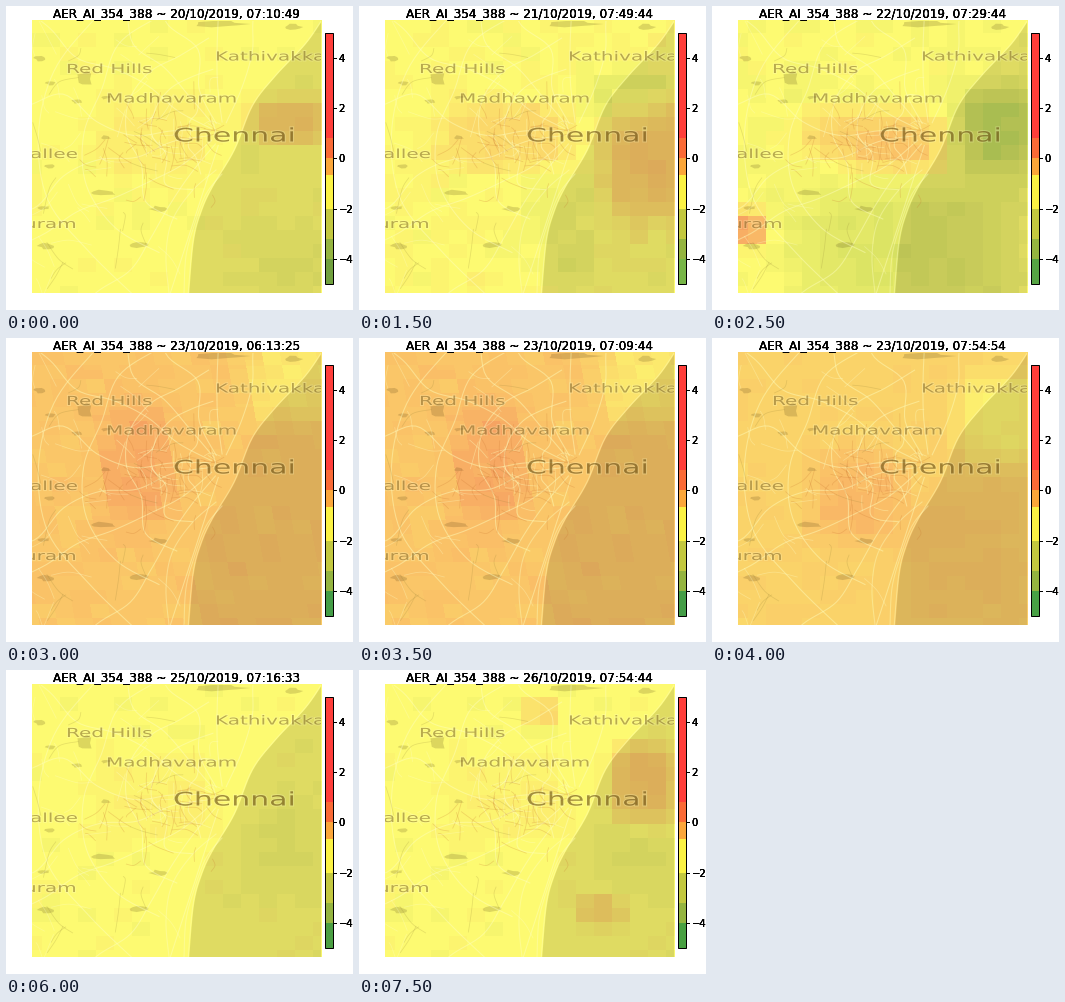
A matplotlib script for the animation above (8000 ms loop, 347x304 px).

```python
import matplotlib.pyplot as plt
import numpy as np
from matplotlib.animation import FuncAnimation
from matplotlib.patches import PathPatch, Polygon, Rectangle
from matplotlib.textpath import TextPath
from matplotlib.transforms import Affine2D

W, H, DPI = 347, 304, 72
LEFT, TOP, RIGHT, BOTTOM = 26, 15, 315, 287
plt.rcParams["font.family"] = "DejaVu Sans"

fig = plt.figure(figsize=((W + 1e-3) / DPI, (H + 1e-3) / DPI), dpi=DPI,
                 facecolor="white")
ax = fig.add_axes([0, 0, 1, 1])
ax.set(xlim=(0, W), ylim=(H, 0))
ax.axis("off")
frame = Rectangle((LEFT, TOP), RIGHT - LEFT, BOTTOM - TOP,
                  transform=ax.transData)

# Aerosol colours over land, from low to high
RAMP = np.array([plt.matplotlib.colors.to_rgb(c) for c in (
    "#96c655", "#d6e062", "#fdfa71", "#fbd86a", "#fabe67", "#f69e62")])
X, Y = np.meshgrid(np.arange(LEFT, RIGHT) + 0.5, np.arange(TOP, BOTTOM) + 0.5)


def field(seed, base, noise, *blobs, cell=(18, 14), shear=0.0):
    """Blocky value field: base level plus soft-edged boxes (x, y, rx, ry, amp)."""
    cw, ch = cell
    ci = np.floor((X - shear * Y) / cw).astype(int)
    cj = np.floor(Y / ch).astype(int)
    cx, cy = (ci + 0.5) * cw + shear * Y, (cj + 0.5) * ch
    grid = np.random.default_rng(seed).normal(0, noise, (60, 60))
    v = base + grid[cj % 60, ci % 60]
    for x, y, rx, ry, amp in blobs:
        v += amp * np.exp(-((cx - x) / rx) ** 4 - ((cy - y) / ry) ** 4)
    v = np.clip(np.round(v * 6) / 6, 0, 5)
    steps = np.arange(len(RAMP))
    return np.stack([np.interp(v, steps, RAMP[:, k]) for k in range(3)], -1)


oct20 = field(1, 2, 0.07, (285, 115, 42, 22, 1.4), (150, 135, 60, 40, 0.4),
              (285, 255, 40, 36, -0.3))
oct21 = field(2, 2.05, 0.1, (145, 130, 65, 32, 1), (290, 150, 48, 62, 1.6),
              (270, 95, 45, 26, -0.9), (205, 225, 34, 60, -0.4))
oct22 = field(3, 1.95, 0.08, (160, 128, 70, 24, 1.3), (185, 150, 46, 18, 1),
              (34, 222, 17, 18, 2.8), (190, 245, 110, 68, -0.75),
              (290, 125, 48, 46, -1.3))
oct23a = field(4, 3.7, 0.1, (132, 125, 38, 62, 0.9),
               (290, 40, 55, 45, -1.2), shear=0.18)
oct23b = field(5, 3.2, 0.07, (145, 160, 48, 48, 0.9),
               (290, 80, 45, 48, -1), (250, 215, 70, 72, 0.4))
oct24 = field(6, 2.5, 0.08, (135, 110, 62, 105, 1), (160, 180, 42, 32, 1),
              (265, 185, 58, 58, 0.9), (215, 262, 38, 26, -0.4))
city = (150, 130, 60, 40, 0.3)
bay = (285, 180, 42, 50, -0.25)
oct25 = field(7, 2, 0.06, city, bay)
oct26 = field(7, 2, 0.06, city, bay, (285, 115, 34, 40, 1.7),
              (182, 44, 14, 14, 1.1), (240, 240, 24, 18, 1))

# Each day: map, lowest colour-bar tone, pass times
PASSES = [
    (oct20, "#70a03e", "20/10/2019, 07:10:49", "20/10/2019, 08:09:44"),
    (oct21, "#78b648", "21/10/2019, 06:51:47", "21/10/2019, 07:49:44"),
    (oct22, "#56a444", "22/10/2019, 06:32:36", "22/10/2019, 07:29:44"),
    (oct23a, "#449d47", "23/10/2019, 06:13:25", "23/10/2019, 07:09:44"),
    (oct23b, "#48a145", "23/10/2019, 07:54:54", "23/10/2019, 08:54:44"),
    (oct24, "#4b9f43", "24/10/2019, 07:35:44", "24/10/2019, 08:34:44"),
    (oct25, "#4b9f43", "25/10/2019, 07:16:33", "25/10/2019, 08:14:44"),
    (oct26, "#48a042", "26/10/2019, 06:57:22", "26/10/2019, 07:54:44"),
]

image = ax.imshow(oct20, extent=(LEFT, RIGHT, BOTTOM, TOP), aspect="auto",
                  interpolation="nearest", zorder=1)
ax.set(xlim=(0, W), ylim=(H, 0))


def smooth(points, n=8):
    """Catmull-Rom curve through the points."""
    p = np.array([points[0], *points, points[-1]], float)
    t = np.linspace(0, 1, n, endpoint=False)[:, None]
    out = []
    for a, b, c, d in zip(p, p[1:], p[2:], p[3:]):
        out.append(b + 0.5 * t * (c - a + t * (
            2 * a - 5 * b + 4 * c - d + t * (3 * (b - c) + d - a))))
    return np.vstack(out + [p[-1:]])


def on_map(artist):
    ax.add_artist(artist)
    artist.set_clip_path(frame)


def road(points, color="#ffffbe", lw=1.0, alpha=0.4):
    line, = ax.plot(*smooth(points).T, color=color, lw=lw, alpha=alpha, zorder=3)
    line.set_clip_path(frame)


# Sea and lakes
shore = np.array([(318, 12), (300, 38), (270, 70), (247, 100), (229, 144),
                  (207, 181), (196, 205), (188, 235), (183, 290)])
sea = np.vstack([smooth(shore), (330, 290), (330, 12)])
on_map(Polygon(sea, fc="#100800", alpha=0.125, lw=0, zorder=2))
road(shore - (1, 0))

rng = np.random.default_rng(12)


def lake(x, y, rx, ry):
    a = np.linspace(0, 2 * np.pi, 11)[:-1]
    r = rng.uniform(0.6, 1.2, 10)
    on_map(Polygon(np.c_[x + rx * r * np.cos(a), y + ry * r * np.sin(a)],
                   fc="#302000", alpha=0.16, lw=0, zorder=2))


for x, y, rx in [(78, 73, 8), (98, 187, 15), (40, 240, 8), (152, 203, 9),
                 (134, 239, 10), (215, 18, 26), (287, 21, 9), (34, 52, 6)]:
    lake(x, y, rx, 8 if y == 73 else 3)
for _ in range(6):
    lake(rng.uniform(30, 130), rng.uniform(30, 280), 6, 2)

# Main roads: rays and rings around the harbour, plus two channels
hub = np.array([216, 128])


def polar(r, deg):
    a = np.radians(deg)
    return hub + np.c_[r * np.cos(a), r * np.sin(a)]


for deg in range(108, 290, 20):
    r = np.linspace(12, 240, 7)
    road(polar(r, deg + rng.normal(0, 4, 7) * (deg > 115)), lw=1.1, alpha=0.45)
for r in (36, 66, 98, 138, 176):
    deg = np.linspace(118, 262, 8)
    road(polar(r + rng.normal(0, 5, 8), deg), lw=1.1, alpha=0.45)
road([(210, 164), (186, 185), (166, 215), (160, 250), (163, 287)], lw=1.1)
road([(216, 168), (200, 188), (188, 220), (180, 250), (178, 287)], lw=1.1)


def lane(x, y, a, d, bend, color, alpha):
    step = np.array([np.cos(a), np.sin(a)]) * d
    road([(x, y) - step, (x, y) + rng.normal(0, bend, 2), (x, y) + step],
         color, 0.8, alpha)


# City streets, denser towards the centre
for k in range(75):
    x, y = min(rng.normal(158, 32), 208), rng.normal(138, 20)
    a = rng.choice([0.1, 1.5]) + rng.normal(0, 0.35)
    style = ("#c8702c", 0.24) if k % 3 else ("#ffffbe", 0.4)
    lane(x, y, a, rng.uniform(6, 14), 2, *style)

# Country lanes
for k in range(40):
    style = ("#ffffc8", 0.32) if k % 3 else ("#8a7a30", 0.2)
    lane(rng.uniform(26, 165), rng.uniform(18, 285), rng.uniform(0, np.pi),
         rng.uniform(8, 20), 3, *style)

# Place names; the map tiles are wider than tall
TILE_ASPECT = 1.6


def place(name, x, y, size=12.5, alpha=0.42):
    path = TextPath((0, 0), name, size=size)
    path = Affine2D().scale(TILE_ASPECT, -1).translate(x, y).transform_path(path)
    on_map(PathPatch(path, fc="none", ec="#ffffc8", lw=2, alpha=0.25, zorder=4))
    on_map(PathPatch(path, fc="#5a3c00", lw=0, alpha=alpha, zorder=5))


place("Red Hills", 60, 67)
place("Kathivakkam", 209, 54.5)
place("Madhavaram", 100, 96.5)
place("Chennai", 167, 135.5, 18.7, 0.55)
place("allee", 24, 152)
place("uram", 18, 222)

# Colour bar
BAR_X, BAR_W, ZERO, UNIT = 318.5, 8, 152.5, 25.15
BANDS = [(5, "#ff3e3a"), (0.8, "#fa6a36"), (0, "#fba63a"), (-0.65, "#fbf244"),
         (-2, "#c3c83f"), (-3.2, "#94b440"), (-4, "#56a444")]
for hi, color in BANDS:
    band = ax.add_patch(Rectangle((BAR_X, ZERO - hi * UNIT), BAR_W,
                                  (hi + 5) * UNIT, fc=color, lw=0, zorder=2))
ax.add_patch(Rectangle((BAR_X, ZERO - 5 * UNIT), BAR_W, 10 * UNIT, fc="none",
                       ec="black", lw=1, zorder=3))


def ink(x, y, text, size, **kw):
    """Overprinted text, which hardens its edges."""
    return [ax.text(x, y, text, size=size, color="black", zorder=6, **kw)
            for _ in range(4)]


for v in range(-4, 5, 2):
    y = ZERO - v * UNIT
    ax.plot([BAR_X + BAR_W, BAR_X + BAR_W + 3.5], [y, y], color="black", lw=1)
    ink(332.5, y + 3.7, str(v).replace("-", "\u2212"), 10, va="baseline")

title = ink(170.5, 11, "", 12, ha="center", va="baseline")


def draw(i):
    day, tone, *times = PASSES[i // 2]
    image.set_data(day)
    band.set_facecolor(tone)
    for t in title:
        t.set_text("AER_AI_354_388 ~ " + times[i % 2])
    return [image, band, *title]


anim = FuncAnimation(fig, draw, frames=2 * len(PASSES), interval=500,
                     repeat=True, repeat_delay=0, blit=False)
plt.show()
```
